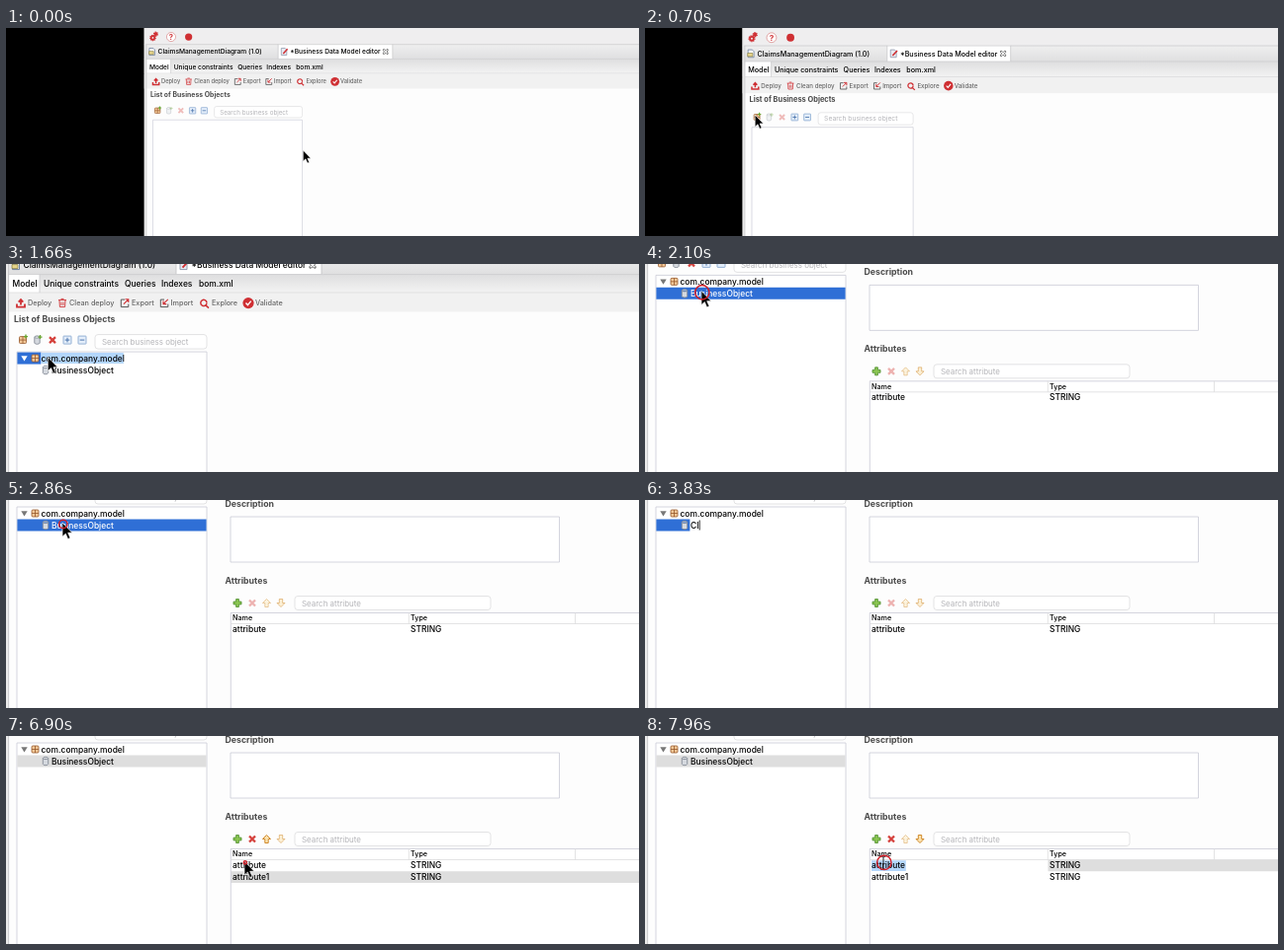
Animation, 640 px wide and 211 px high, one loop 8 s. Source, as an HTML page with a canvas:

```html
<!DOCTYPE html>
<html lang="en">
<head>
<meta charset="utf-8">
<title>Business data model editor</title>
<style>
  html, body { margin: 0; overflow: hidden; background: #000; }
  canvas { display: block; }
</style>
</head>
<body>
<canvas id="stage" width="640" height="211"></canvas>
<script>
const ctx = document.getElementById('stage').getContext('2d');
const LOOP = 8000, RED = '#cf2f33', BLUE = '#2f6fd6', MARK = '#b3d6fb', GREY = '#dedede', LINE = '#c9cbd6';

// Times of the main actions, in ms
const T = { addObject: 1090, pickObject: 1940, rename: 2900, typing: 3600, pointerBack: 4600,
            addAttribute: 5660, newRow: 5730, pickAttribute: 6910, editAttribute: 7250 };
const KEYS = [3600, 3830, 3930, 4060, 4200];
const RINGS = [1015, 1890, 2320, 2760, 3230, 6900, 7320, 7750];
const RING_MS = 410;

// Pointer path: time, x, y
const PATH = [[30, 204, 157.6], [660, 14.8, 103.8], [1380, 14.8, 103.8], [1850, 57, 134.5], [4600, 57, 134.5],
              [5120, 243, 228], [5330, 233, 217.5], [6460, 233, 217.5], [6730, 241, 238.5]];

const ease = (t, a, b) => (1 - Math.cos(Math.PI * Math.min(1, Math.max(0, (t - a) / (b - a))))) / 2;

function pointerAt(t) {
  let [, x, y] = PATH[0];
  for (let i = 1; i < PATH.length; i++) {
    const k = ease(t, PATH[i - 1][0], PATH[i][0]);
    x += (PATH[i][1] - PATH[i - 1][1]) * k;
    y += (PATH[i][2] - PATH[i - 1][2]) * k;
  }
  return [x, y];
}

function box(x, y, w, h, fill, stroke, radius = 0) {
  ctx.beginPath();
  ctx.roundRect(x, y, w, h, radius);
  if (fill) { ctx.fillStyle = fill; ctx.fill(); }
  if (stroke) { ctx.strokeStyle = stroke; ctx.lineWidth = 0.8; ctx.stroke(); }
}

function shade(y, h, top, bottom) {
  const fill = ctx.createLinearGradient(0, y, 0, y + h);
  fill.addColorStop(0, top);
  fill.addColorStop(1, bottom);
  box(0, y, 660, h, fill);
}

function text(str, x, y, color = '#000', size = 8.45, weight = 500) {
  ctx.font = `${weight} ${size}px Inter, sans-serif`;
  ctx.fillStyle = color;
  ctx.fillText(str, x, y);
  return ctx.measureText(str).width;
}

const heading = (str, x, y) => text(str, x, y, '#4a4a4a', 8.75, 650);

function icon(x, y, path, stroke, fill, width = 1, alpha = 1) {
  const shape = new Path2D(path);
  ctx.save();
  ctx.translate(x, y);
  ctx.globalAlpha = alpha;
  if (fill) { ctx.fillStyle = fill; ctx.fill(shape); }
  if (stroke) { ctx.strokeStyle = stroke; ctx.lineWidth = width; ctx.stroke(shape); }
  ctx.restore();
}

function disc(x, y, r, fill, stroke, width = 1) {
  ctx.beginPath();
  ctx.arc(x, y, r, 0, 7);
  if (fill) { ctx.fillStyle = fill; ctx.fill(); }
  if (stroke) { ctx.strokeStyle = stroke; ctx.lineWidth = width; ctx.stroke(); }
}

function gear(x, y, r) {
  ctx.setLineDash([1.4, 0.9]);
  disc(x, y, r + 0.6, null, RED, 1.6);
  ctx.setLineDash([]);
  disc(x, y, r - 0.6, null, RED, 2.1);
}

const cross = (x, y, alpha) => icon(x, y, 'M-3-3L3 3M3-3L-3 3', '#d5413c', null, 2.3, alpha);
const plus = (x, y) => icon(x, y, 'M-1.4-4h2.8v2.6h2.6v2.8h-2.6v2.6h-2.8v-2.6h-2.6v-2.8h2.6z', '#4c8c2b', '#8cc653', 0.8);
const arrow = (x, y, dir, alpha) =>
  icon(x, y, `M0 ${-4 * dir}L4 0H1.7V${4 * dir}H-1.7V0H-4z`, '#d08a2c', '#fbe3b0', 1, alpha);

function grid(x, y) {
  box(x - 3.5, y - 3.5, 7, 7, '#f3c898', '#96592b', 1);
  icon(x, y, 'M0-3.5v7M-3.5 0h7', '#96592b', null, 0.8);
}

function cylinder(x, y, alpha = 1) {
  icon(x, y, 'M-2.7-3C-2.7-4.6 2.7-4.6 2.7-3V3C2.7 4.6-2.7 4.6-2.7 3zM-2.7-3C-2.7-1.6 2.7-1.6 2.7-3',
       '#868d98', '#d5d9df', 0.9, alpha);
}

function treeButton(x, y, path) {
  box(x - 4, y - 4, 8, 8, '#e4eefa', '#7d9fcb', 0.5);
  icon(x, y, path, '#4a74ac', null, 1);
}

function drawHeader() {
  box(0, 0, 660, 21, '#efeeef');
  gear(11, 12.6, 2.8);
  gear(14.8, 7.8, 1.8);
  disc(34.5, 11.5, 5.8, '#fff', '#d98c8c', 0.9);
  text('?', 31.8, 15, RED, 9.6, 700);
  disc(57, 11.5, 4.6, RED);

  shade(21, 19, '#efefef', '#dfdfe0');
  box(172, 21, 147, 19, '#fff');
  icon(0, 0, 'M0 21.2H660M172 21V40M319 21V40', '#c2c2c4', null, 0.8);
  icon(10, 30.5, 'M-3.5-4.5h5l2 2v7h-7z', '#5f7596', '#fff', 0.9);
  box(6, 30, 6, 4, '#e6d489', '#8a8048');

  text('ClaimsManagementDiagram (1.0)', 17.5, 33.6);
  icon(180, 30.5, 'M-4-4.5h5l2 2v7h-7z', '#8a93a8', '#e8ebf2', 0.9);
  icon(180, 30.5, 'M-1.5 2.5L4-3.5', RED, null, 1.9);
  text('*Business Data Model editor', 187.5, 33.6);
  icon(310, 30.5, 'M-3-3h1.5L0-1.5 1.5-3H3v1.5L1.5 0 3 1.5V3H1.5L0 1.5-1.5 3H-3V1.5L-1.5 0-3-1.5z', '#444', '#fff', 0.9);

  shade(40, 18.5, '#dededf', '#f3f3f3');
  box(3, 40, 31, 18.5, '#fff');
  icon(0, 0, 'M0 40H660M3 58.6H660M34 40V58.5', '#cbcbcd', null, 0.8);
  [['Model', 6.5], ['Unique constraints', 38], ['Queries', 120], ['Indexes', 157], ['bom.xml', 195]]
    .forEach(([label, x]) => text(label, x, 52.9));
}

function drawActions() {
  const y = 69;
  box(0, 59, 660, 19, '#f1f1f1');
  icon(15, y, 'M-4 1v3h8V1M0 2V-3M-2.3-1L0-3.5 2.3-1', RED, null, 1.8);
  icon(57, y, 'M-4-3h8M-1.5-4.2h3M-3-3l.4 7h5.2l.4-7M-1-1v3.5M1-1v3.5', RED, null, 0.9);
  icon(120, y, 'M0-3.5h-3.7v7.5h7.5V1', '#555', null, 1);
  icon(120, y, 'M-1 1L3.5-3.5M.5-3.8h3.3v3.3', RED, null, 1.1);
  icon(160, y, 'M0-3.5h-3.7v7.5h7.5V1', '#555', null, 1);
  icon(160, y, 'M3.8-3.8L-.8.8M-1-2.2v3.2h3.2', RED, null, 1.1);
  icon(200, y, 'M3 0A3.1 3.1 0 1 1 2.99-.4M1.6 2L5 5', RED, null, 1.5);
  disc(245, y, 5.6, RED);
  icon(245, y, 'M-2.5 0L-.6 2 2.7-2', '#fff', null, 1.4);
  [['Deploy', 22], ['Clean deploy', 64], ['Export', 127], ['Import', 166.5], ['Explore', 208], ['Validate', 252]]
    .forEach(([label, x]) => text(label, x, 71.7, '#666', 7.25));
}

function drawTree(t) {
  const enabled = t >= T.addObject ? 1 : 0.35;
  heading('List of Business Objects', 8, 88.6);
  grid(17, 106.5);
  icon(20, 103, 'M-2 0h4M0-2v4', '#6aa632', null, 1.4);
  cylinder(31.5, 106.5, enabled);
  icon(34.5, 103.5, 'M-2 0h4M0-2v4', '#6aa632', null, 1.4, enabled);
  cross(47, 106.5, enabled);
  treeButton(62, 106.5, 'M-2.3 0h4.6M0-2.3v4.6');
  treeButton(77, 106.5, 'M-2.3 0h4.6');
  box(90, 101, 113, 14.5, '#fff', '#dcdcde', 3);
  text('Search business object', 97, 111.2, '#b4b4b8', 7.95, 400);

  box(11, 118.5, 192, 300, '#fff', LINE);
  if (t < T.addObject) return;
  const packageEdit = t < T.pickObject, renaming = t >= T.rename && t < T.addAttribute;
  if (packageEdit) {
    box(11.4, 119, 24, 12, BLUE);
    box(35.4, 119.5, 83.5, 11, MARK);
  } else if (t >= T.addAttribute) {
    box(11.4, 131, 191.2, 12, GREY);
  } else {
    box(11.4, 131, renaming ? 34 : 191.2, 12, BLUE);
  }
  icon(18.5, 125, 'M-3.2-2.3H3.2L0 3z', null, packageEdit ? '#fff' : '#777');
  grid(29.5, 125);
  text('com.company.model', 35.5, 128);
  cylinder(40, 137);
  if (renaming && t >= T.typing) {
    const typed = 'Claim'.slice(0, KEYS.filter(k => t >= k).length);
    const width = text(typed, 46, 140);
    box(46.4 + width, 132, 0.9, 10, '#111');
  } else {
    if (renaming) box(45.8, 131.6, 63.5, 11, MARK);
    const selected = !packageEdit && t < T.rename;
    text('BusinessObject', 46, 140, selected ? '#fff' : undefined);
  }
}

function drawDetails(t) {
  heading('Description', 221.5, 118);
  box(227, 128.5, 332.5, 46, '#fff', LINE);
  heading('Attributes', 221.5, 196);

  const added = t >= T.newRow, first = t >= T.pickAttribute;
  plus(234, 216);
  cross(249, 216, added ? 1 : 0.4);
  arrow(263.5, 216, 1, added && !first ? 1 : 0.4);
  arrow(278, 216, -1, first ? 1 : 0.5);
  box(292, 209, 198, 14, '#fff', '#dcdcde', 3);
  text('Search attribute', 299, 219, '#b4b4b8', 7.95, 400);

  box(227, 226, 440, 200, '#fff');
  const editing = t >= T.editAttribute;
  if (first) {
    box(editing ? 407.5 : 227.4, 237.2, 440, 11.6, GREY);
    if (editing) box(229, 237.8, 34.8, 10.6, MARK);
  } else if (added) {
    box(227.4, 248.8, 440, 11.6, GREY);
  }
  icon(0, 0, 'M227.3 226V430M227 226H660', LINE, null, 0.8);
  icon(0, 0, 'M227 237H660M407.3 226V237M575.5 226V237', '#dcdcde', null, 0.8);
  text('Name', 229, 233.8, undefined, 7.2);
  text('Type', 409, 233.8, undefined, 7.2);
  ['attribute', 'attribute1'].slice(0, added ? 2 : 1).forEach((name, i) => {
    text(name, 229, 245.6 + 11.7 * i);
    text('STRING', 409, 245.6 + 11.7 * i);
  });
}

function drawPointer(t) {
  const [x, y] = pointerAt(t);
  const hidden = t >= T.typing && t < T.pointerBack;
  const beam = (t >= T.rename && t < 4790) || t >= T.editAttribute;
  const start = RINGS.find(s => t >= s && t < s + RING_MS);
  if (!hidden) {
    if (beam) {
      icon(x, y + 1.5, 'M-2.5-6.5Q0-6.5 0-5Q0-6.5 2.5-6.5M0-5V5.5M-2.5 7Q0 7 0 5.5Q0 7 2.5 7', '#222', null, 1);
    } else {
      icon(x, y, 'M0 0V14.2L3.3 11.2 5.6 16.6 8 15.5 5.7 10.3H10z', '#fff', '#000', 0.7);
    }
  }
  if (start !== undefined) {
    const k = (t - start) / RING_MS;
    ctx.globalAlpha = Math.min(1, (1 - k) * 3);
    disc(x + 0.8, y + 1.4, 1.5 + 11 * k, null, '#d0202a', 1.5);
    ctx.globalAlpha = 1;
  }
}

function draw(t) {
  const zoom = ease(t, 398, 1228), scale = 0.787 + 0.213 * zoom;
  ctx.setTransform(1, 0, 0, 1, 0, 0);
  ctx.fillStyle = '#000';
  ctx.fillRect(0, 0, 640, 211);
  ctx.setTransform(scale, 0, 0, scale, 139.8 * (1 - zoom), -111.5 * ease(t, 1376, 2206));
  box(0, 0, 820, 440, '#fdfdfd');
  drawHeader();
  drawActions();
  drawTree(t);
  if (t >= T.pickObject) drawDetails(t);
  box(0, 0, 2.2, 440, '#ececec');
  box(2.2, 21, 0.9, 420, '#c4c4c6');
  drawPointer(t);
}

function tick() {
  draw(performance.now() % LOOP);
  requestAnimationFrame(tick);
}
tick();
</script>
</body>
</html>
```
